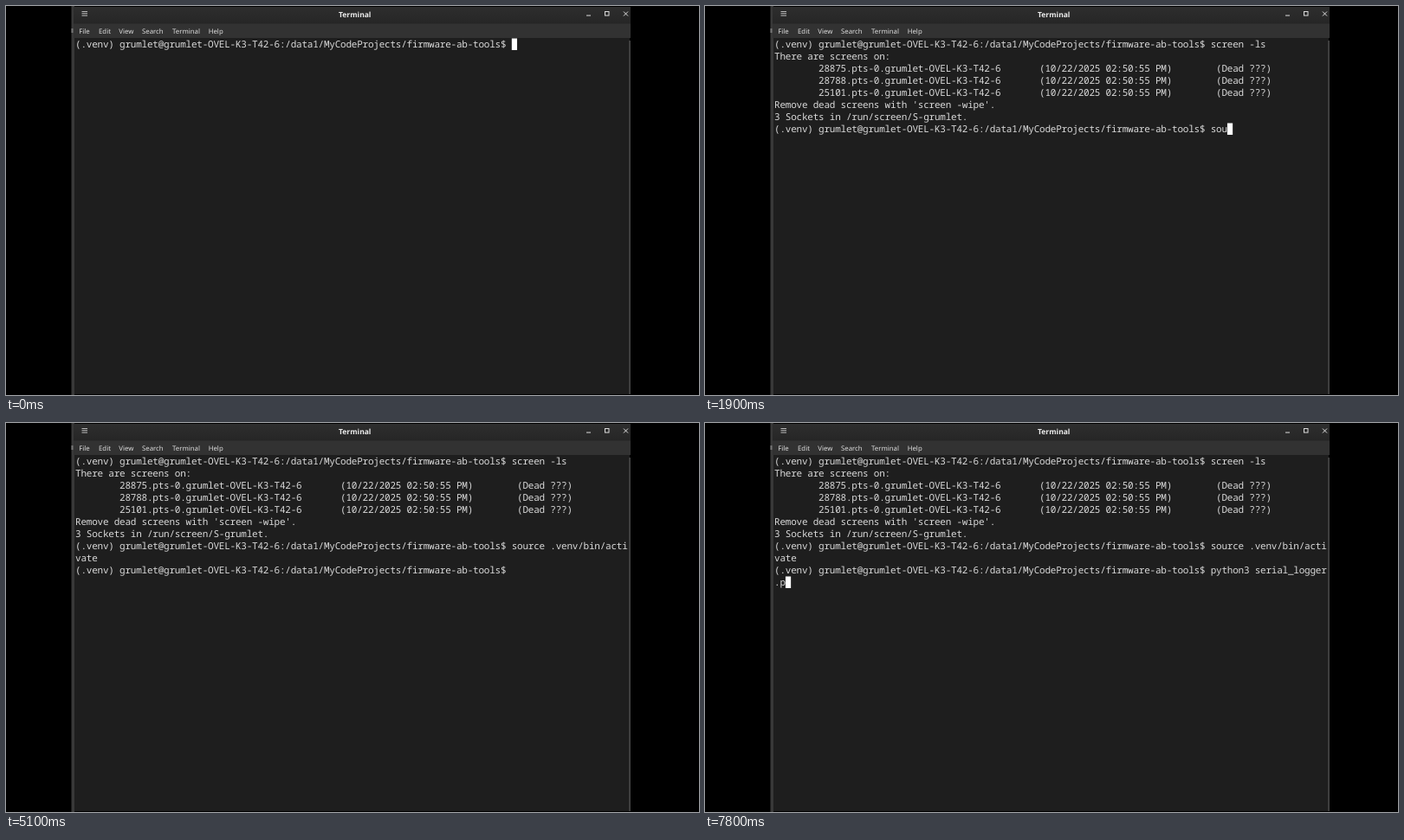
An HTML page with a canvas that plays this animation: 800x450 px, repeating every 8 s.

```html
<!DOCTYPE html>
<html lang="en">
<head>
<meta charset="utf-8">
<title>Terminal</title>
<style>
  html, body { margin: 0; width: 100%; height: 100%; overflow: hidden; background: #000; }
  canvas { display: block; }
</style>
</head>
<body>
<canvas id="stage" width="800" height="450"></canvas>
<script>
const ctx = document.getElementById('stage').getContext('2d');
const LOOP = 8000, STEP = 100;
const COLS = 100, TAB = 8, CELL = 6.375, ROW = 14, LEFT = 80, TOP = 37;

const user = 'grumlet';
const host = user + '-OVEL-K3-T42-6';
const prompt = `(.venv) ${user}@${host}:/data1/MyCodeProjects/firmware-ab-tools$ `;
const listing = 'There are screens on:\n' +
  [28875, 28788, 25101].map(id =>
    `\t${id}.pts-0.${host}\t(10/22/2025 02:50:55 PM)\t(Dead ???)\n`).join('') +
  `Remove dead screens with 'screen -wipe'.\n3 Sockets in /run/screen/S-${user}.\n`;

// Each burst of typing: first step, last step, characters present at its end.
const commands = [
  { text: 'screen -ls', enter: 1600, output: listing,
    bursts: [[400, 500, 2], [700, 1100, 8], [1400, 1500, 10]] },
  { text: 'source .venv/bin/activate', enter: 4800, output: '',
    bursts: [[1800, 2100, 5], [2300, 2400, 8], [2600, 2800, 11], [3000, 3700, 17], [3900, 4600, 25]] },
  { text: 'python3 serial_logger.py', enter: Infinity, output: '',
    bursts: [[5200, 5300, 2], [5500, 5500, 5], [5800, 6100, 10], [6300, 6400, 12],
             [6600, 6700, 14], [7000, 7000, 15], [7200, 7500, 21], [7700, 7800, 23]] }
];
const cursorHidden = [300, 5100];

function typedCount(bursts, t) {
  let count = 0;
  for (const [first, last, end] of bursts) {
    if (t < first) break;
    const steps = (last - first) / STEP + 1;
    const done = Math.min(steps, (t - first) / STEP + 1);
    count += Math.round((end - count) * done / steps);
  }
  return count;
}

function screenText(t) {
  let text = '';
  for (const { text: command, enter, output, bursts } of commands) {
    text += prompt + command.slice(0, typedCount(bursts, t));
    if (t < enter) break;
    text += '\n' + output;
  }
  return text;
}

function rect(x, y, w, h, color) {
  ctx.fillStyle = color;
  ctx.fillRect(x, y, w, h);
}

function label(text, x, y, font, color) {
  ctx.font = font;
  ctx.fillStyle = color;
  ctx.fillText(text, x, y);
}

function drawWindow() {
  rect(0, 0, 800, 450, '#000');
  rect(75.5, 0, 3.5, 450, '#393939');
  rect(75.5, 26, 2, 5, '#777');

  const bar = ctx.createLinearGradient(0, 1, 0, 20);
  bar.addColorStop(0, '#2e2e2e');
  bar.addColorStop(1, '#262626');
  rect(78, 1, 643, 20, bar);
  rect(78, 20.5, 643, 16.5, '#323232');
  rect(79, 37, 641, 412, '#1e1e1e');
  rect(719.5, 40, 1.2, 409, '#5c5c5c');

  label('Terminal', 384, 12.6, 'bold 8.5px "Noto Sans", sans-serif', '#ececec');
  const menu = { File: 84.3, Edit: 107, View: 130.3, Search: 157, Terminal: 192, Help: 233.7 };
  for (const name in menu) label(name, menu[name], 31.6, '7.8px "Noto Sans", sans-serif', '#dedede');

  for (const y of [6, 8.3, 10.6]) rect(87.5, y, 6.5, 0.9, '#ccc');
  rect(670, 10.5, 5, 1, '#ddd');
  ctx.strokeStyle = '#ddd';
  ctx.lineWidth = 1;
  ctx.strokeRect(691.5, 6.5, 4.5, 4.5);
  ctx.beginPath();
  ctx.moveTo(713, 6.5); ctx.lineTo(718, 11.5);
  ctx.moveTo(718, 6.5); ctx.lineTo(713, 11.5);
  ctx.stroke();
}

function drawTerminal(t) {
  let col = 0, row = 0;
  ctx.font = '11px "Noto Sans Mono", monospace';
  ctx.fillStyle = '#dadada';
  for (const ch of screenText(t)) {
    if (ch === '\n') { col = 0; row++; continue; }
    if (ch === '\t') { col += TAB - col % TAB; continue; }
    ctx.fillText(ch, LEFT + col * CELL, TOP + row * ROW + 11);
    if (++col === COLS) { col = 0; row++; }
  }
  if (!cursorHidden.includes(t)) rect(LEFT + col * CELL + 0.2, TOP + row * ROW + 0.5, 6.2, 13.5, '#fff');
}

function tick() {
  const t = Math.floor((performance.now() - start) % LOOP / STEP) * STEP;
  drawWindow();
  drawTerminal(t);
  requestAnimationFrame(tick);
}

ctx.textRendering = 'geometricPrecision';
const start = performance.now();
tick();
</script>
</body>
</html>
```
